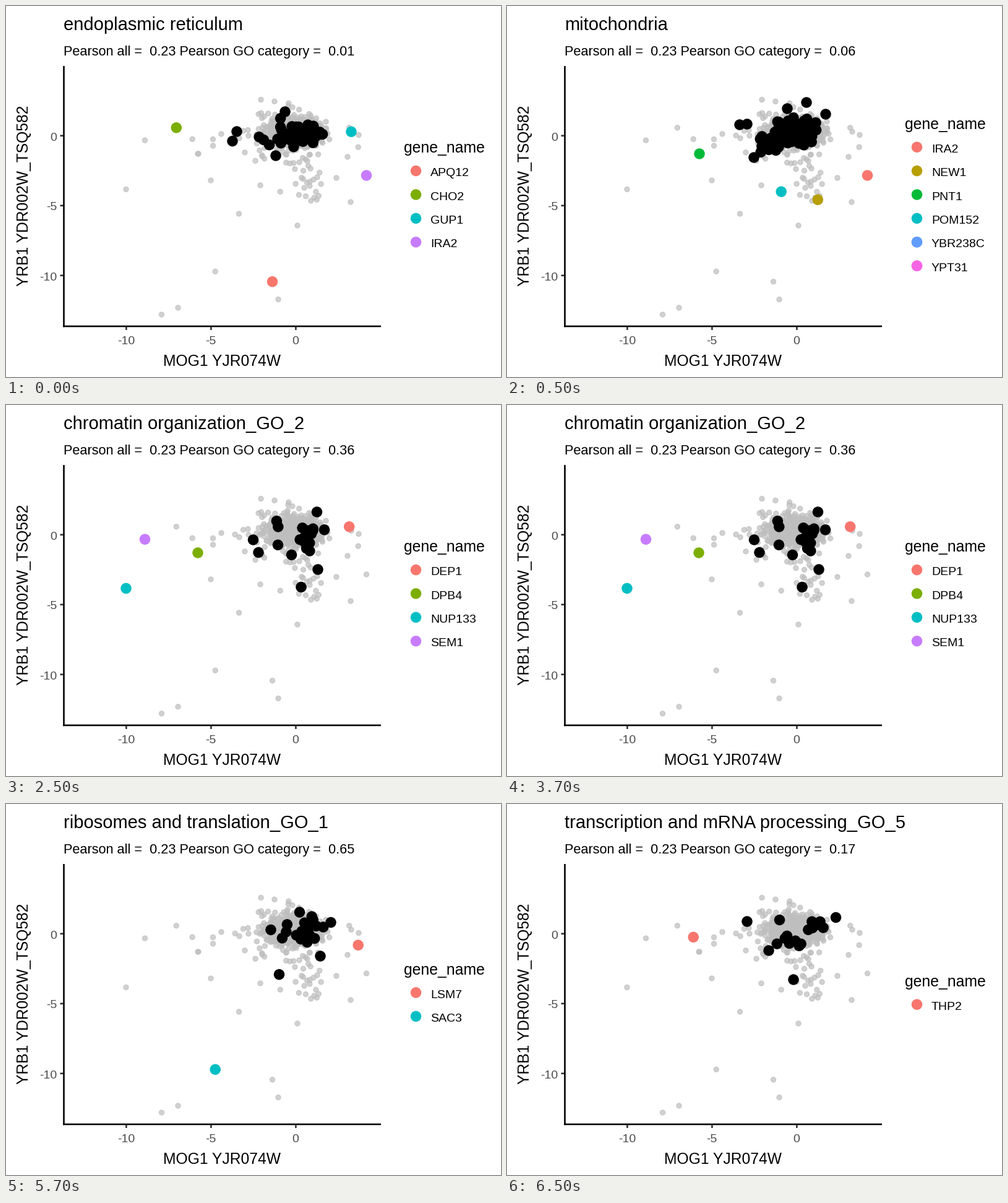
A matplotlib script that plays this animation: 800 px wide and 600 px high, repeating every 8 s.

```python
import numpy as np
import matplotlib.pyplot as plt
from matplotlib.animation import FuncAnimation

plt.rcParams["font.family"] = "Liberation Sans"
PT = 0.72  # points per pixel at 100 dpi

fig = plt.figure(figsize=(8, 6), dpi=100, facecolor="white")
ax = fig.add_axes([0, 0, 1, 1])
ax.set(xlim=(0, 800), ylim=(600, 0))
ax.axis("off")


def text(x, y, s, size, color="black", **kw):
    return ax.text(x, y, s, fontsize=size * PT, color=color, va="baseline", **kw)


def dots(points, color, radius, **kw):
    x, y = np.array(points, float).T
    sizes = np.full(len(x), (2 * radius * PT) ** 2)  # per dot, so none snap to pixels
    return ax.scatter(x, y, s=sizes, c=color, edgecolors=color,
                      linewidths=1.45 * PT, **kw)


def line(x, y, color, zorder):
    ax.plot(x, y, color=color, lw=2.6 * PT, solid_capstyle="butt",
            zorder=zorder, snap=False)


def cluster(seed, count, center, spread, reach=2.2):
    """Seeded normal cloud cut off at `reach` standard deviations."""
    z = np.random.default_rng(seed).normal(size=(count * 2, 2))
    z = z[np.hypot(*z.T) < reach][:count]
    return [tuple(p) for p in np.array(center) + z * spread]


# Genes that get named; YBR238C and YPT31 appear in the legend only
PLACES = {
    "APQ12": (430.5, 445.8), "CHO2": (275.3, 196.8), "GUP1": (558, 203.3),
    "IRA2": (582.5, 274), "NEW1": (502.3, 313.3), "PNT1": (311, 239),
    "POM152": (443.2, 300.3), "DEP1": (554.7, 196.8), "DPB4": (310, 239),
    "NUP133": (194, 296.5), "SEM1": (224.5, 217.2), "LSM7": (569.2, 228.2),
    "SAC3": (338.2, 429.3), "THP2": (301.2, 215.3),
}
loners = [(251.5, 499), (278, 488), (440, 474.5), (376.5, 336), (471, 355),
          (331, 282), (411, 290), (534, 278), (557, 317), (334.5, 215.5),
          (334.5, 226), (348, 207), (412, 151.5), (552, 244), (570, 208.5)]

background = (list(PLACES.values()) + loners
              + cluster(4, 400, (466, 205), (25, 13))
              + cluster(5, 130, (455, 207), (39, 25))
              + cluster(6, 22, (485, 280), (20, 20), 2))
dots(background, "#bebebe", 4, alpha=0.7, zorder=1)

# Axes
line([93.5, 93.5], [97, 519.2], "black", 2)
line([92.3, 606], [518, 518], "black", 2)
for value in (-10, -5, 0):
    x, y = 468.4 + 27.4 * value, 209.8 - 22.6 * value
    line([x, x], [518, 524], "#333333", 1.5)
    line([87.5, 93.5], [y, y], "#333333", 1.5)
    text(x - 0.4, 547, str(value), 19.5, "#4d4d4d", ha="center")
    text(82, y + 7.7, str(value), 19.5, "#4d4d4d", ha="right")
text(349, 582, "MOG1 YJR074W", 24.6, ha="center")
text(36, 307, "YRB1 YDR002W_TSQ582", 24.6, ha="center", rotation=90,
     rotation_mode="anchor")

HUES = {
    1: ["#f8766d"],
    2: ["#f8766d", "#00bfc4"],
    4: ["#f8766d", "#7cae00", "#00bfc4", "#c77cff"],
    6: ["#f8766d", "#b79f00", "#00ba38", "#00bfc4", "#619cff", "#f564e3"],
}


def scene(title, score, names, members):
    """Build one category's artists, hidden until shown."""
    genes = names.split()
    first_key = 324.2 - 19.2 * (len(genes) - 1)
    parts = [text(93, 39, title, 29.17),
             text(93, 80, f"Pearson all =  0.23 Pearson GO category =  {score}", 21.8),
             text(643, first_key - 29.4, "gene_name", 24.8),
             dots(members, "black", 8, zorder=3)]
    for i, (gene, color) in enumerate(zip(genes, HUES[len(genes)])):
        key = (662.5, first_key + 38.4 * i)
        parts.append(dots([key, PLACES.get(gene, key)], color, 8, zorder=4))
        parts.append(text(686, key[1] + 8.7, gene, 19.5))
    for part in parts:
        part.set_visible(False)
    return parts


scenes = [
    scene("endoplasmic reticulum", "0.01", "APQ12 CHO2 GUP1 IRA2",
          [(366, 218.5), (373, 203), (451, 171), (436, 242)]
          + cluster(11, 60, (476, 207), (16, 8))
          + cluster(13, 18, (455, 207), (31, 14))),
    scene("mitochondria", "0.06", "IRA2 NEW1 PNT1 POM152 YBR238C YPT31",
          [(376, 192), (388, 191), (399, 245), (453, 166), (484, 156), (515, 175)]
          + cluster(12, 110, (470, 202), (18, 11))
          + cluster(14, 22, (428, 212), (16, 15))),
    scene("chromatin organization_GO_2", "0.36", "DEP1 DPB4 NUP133 SEM1",
          [(477, 294.5), (504, 266), (502.5, 173), (399.5, 218), (408, 238.5)]
          + cluster(15, 16, (477, 211), (26, 15))),
    scene("ribosomes and translation_GO_1", "0.65", "LSM7 SAC3",
          [(441.5, 275.7), (508, 246), (428, 203.5), (525, 191.5), (474.5, 175)]
          + cluster(16, 17, (480, 204), (18, 13))),
    scene("transcription and mRNA processing_GO_5", "0.17", "THP2",
          [(388, 190), (463, 284), (531.5, 183.5), (423, 237), (440.5, 187.5)]
          + cluster(17, 7, (459, 226), (12, 10))
          + cluster(18, 6, (498, 197), (12, 6))),
]


def update(frame):
    current = (frame + 3) // 4  # the first category holds for one step only
    for i, parts in enumerate(scenes):
        for part in parts:
            part.set_visible(i == current)
    return []


anim = FuncAnimation(fig, update, frames=16, interval=500, repeat=True,
                     repeat_delay=0, blit=False)
plt.show()
```
